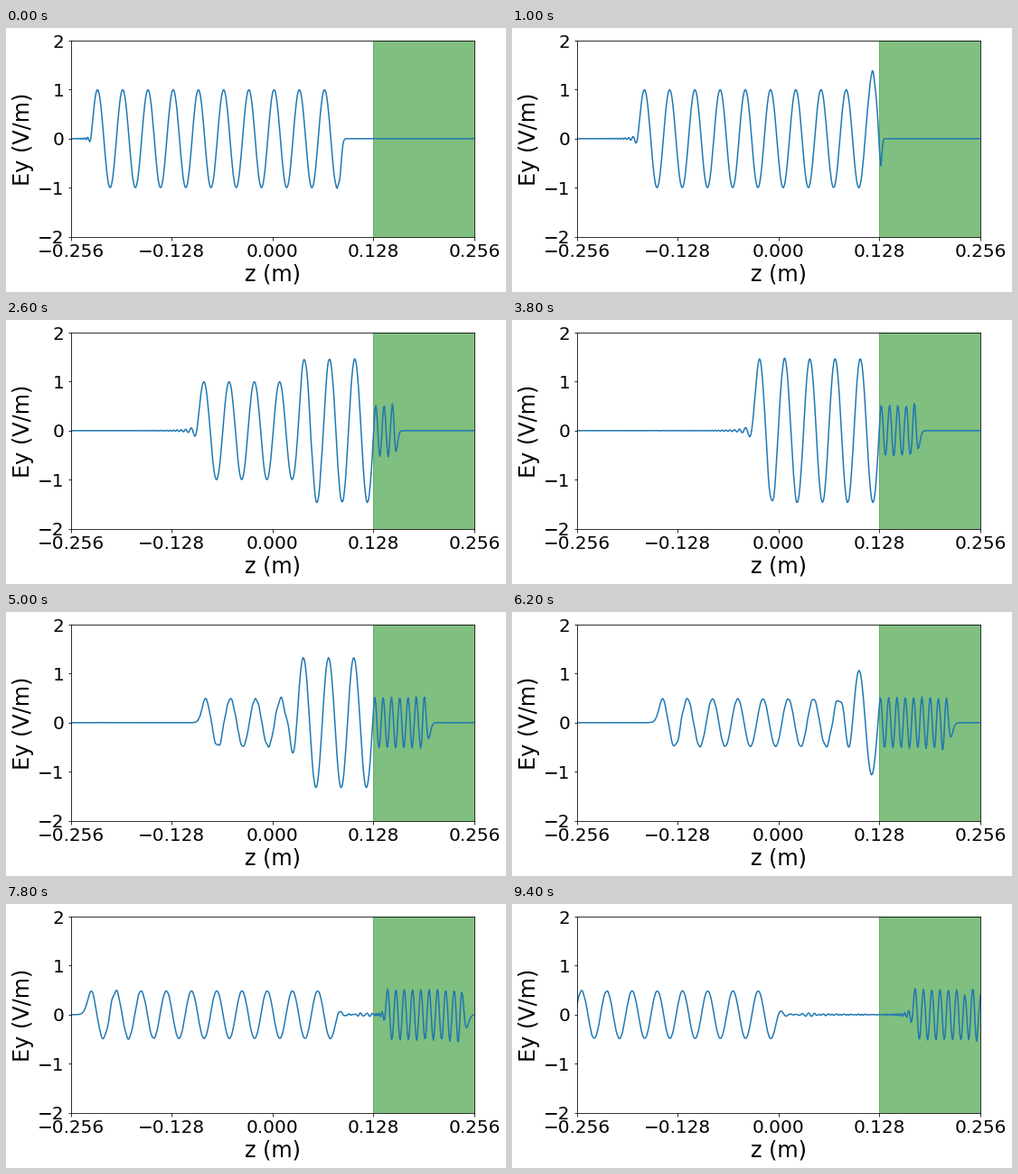
A matplotlib script for the animation above (9600 ms loop, 553 px wide and 293 px high).

```python
import numpy as np
import matplotlib.pyplot as plt
from matplotlib.animation import FuncAnimation

# Stage
WIDTH, HEIGHT, DPI = 553, 293, 72
FRAMES, INTERVAL = 48, 200

# One-dimensional field solver, lengths in cells of 1 mm
CELLS = 512
SLAB = 384                  # cell where the dielectric begins
PAD = 120                   # hidden vacuum cells on either side
COURANT = 0.9 / np.sqrt(3)
EPS_SLAB = 9.0
WAVELENGTH, CYCLES = 32, 10
WARMUP, STEPS = 50, 20      # steps before the first frame and per frame


def permittivity():
    eps = np.ones(CELLS + 2 * PAD + 1)
    start, end = PAD + SLAB, PAD + CELLS
    eps[start:end + 1] = EPS_SLAB
    eps[[start, end]] = (1 + EPS_SLAB) / 2
    return eps


def burst(x):
    """Sine burst of whole cycles that starts at the left edge of the plot."""
    inside = (x >= 0) & (x <= WAVELENGTH * CYCLES)
    return np.where(inside, np.sin(2 * np.pi * x / WAVELENGTH), 0.0)


def simulate():
    """Return the electric field on the visible cells for every frame."""
    eps = permittivity()
    x = np.arange(eps.size) - PAD
    e = burst(x)
    # The magnetic field sits half a cell ahead and half a step back.
    h = -burst(x[:-1] + 0.5 + COURANT / 2)
    gain = COURANT / eps[1:-1]
    fields = []
    for step in range(1, WARMUP + STEPS * (FRAMES - 1) + 1):
        h += COURANT * np.diff(e)
        e[1:-1] += gain * np.diff(h)
        if step >= WARMUP and (step - WARMUP) % STEPS == 0:
            fields.append(e[PAD:PAD + CELLS + 1].copy())
    return fields


fields = simulate()
z = (np.arange(CELLS + 1) - CELLS / 2) * 1e-3

plt.rcParams["font.family"] = "DejaVu Sans"
fig = plt.figure(figsize=(WIDTH / DPI, HEIGHT / DPI), dpi=DPI, facecolor="white")
left, top, box_w, box_h = 71.6, 14.1, 446.4, 217.44
ax = fig.add_axes([left / WIDTH, 1 - (top + box_h) / HEIGHT,
                   box_w / WIDTH, box_h / HEIGHT])

ax.axvspan(0.128, 0.256, color="green", alpha=0.5)
line, = ax.plot(z, fields[0], color="tab:blue", lw=1.5)
ax.set_xlim(-0.256, 0.256)
ax.set_ylim(-2, 2)
ax.set_xticks([-0.256, -0.128, 0, 0.128, 0.256])
ax.set_yticks([-2, -1, 0, 1, 2])
ax.tick_params(labelsize=20)
ax.set_xlabel("z (m)", fontsize=24)
ax.set_ylabel("Ey (V/m)", fontsize=24)


def update(i):
    line.set_ydata(fields[i])
    return line,


anim = FuncAnimation(fig, update, frames=FRAMES, interval=INTERVAL,
                     repeat=True, repeat_delay=0)
plt.show()
```
